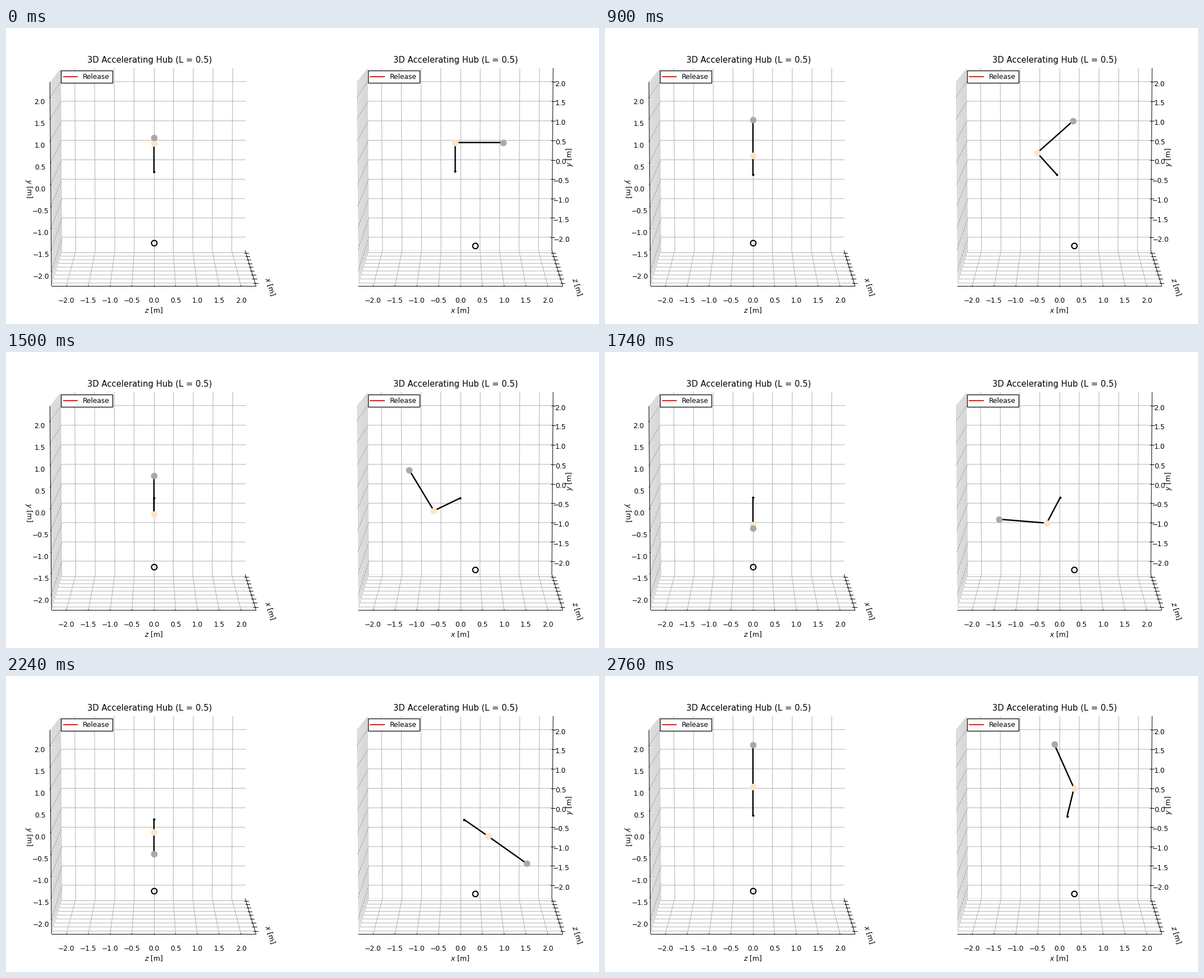
A matplotlib script that plays this animation: 1058x529 px, repeating every 2.78 s.

```python
import math

import matplotlib.pyplot as plt
import numpy as np
from matplotlib.animation import FuncAnimation
from matplotlib.collections import LineCollection
from matplotlib.patches import Rectangle

W, H = 1058, 529
FRAMES, STEP_MS = 139, 20

plt.rcParams["font.family"] = "DejaVu Sans"
plt.rcParams["mathtext.fontset"] = "dejavusans"
fig = plt.figure(figsize=(12, 6), dpi=W / 12, facecolor="white")
ax = fig.add_axes([0, 0, 1, 1])
ax.set_xlim(0, W)
ax.set_ylim(H, 0)
ax.axis("off")

# Perspective camera shared by both views
ELEV = math.radians(7.36)
COS, SIN = math.cos(ELEV), math.sin(ELEV)
SCALE, FOCAL, DIST = 1.1 / 4.5, 3027, 10
CY = 256.6
LEFT, RIGHT = 263.6, 810.9
EDGE = 2.25 * 25 / 24
TICKS = np.arange(-2, 2.1, 0.5)


def project(cx, h, y, near):
    k = FOCAL * SCALE / (DIST - SCALE * (near * COS + y * SIN))
    return cx + h * k, CY - (y * COS - near * SIN) * k


def strokes(segments, color, width, z):
    ax.add_collection(LineCollection(segments, colors=color, linewidths=width, zorder=z))


def label(x, y, text, size=10):
    """Text whose capitals are centred on (x, y)."""
    drop = 0.365 * size * fig.dpi / 72
    ax.text(x, y + drop, text, size=size, ha="center", va="baseline", zorder=4)


def slanted(x, y, text, angle):
    ax.text(x, y, text, size=10, rotation=angle, ha="center", va="center", zorder=4)


def number(v):
    return f"{v:.1f}".replace("-", "\u2212")


def draw_box(cx):
    def p(h, y, near):
        return project(cx, h, y, near)

    grid = []
    for t in TICKS:
        grid.append([p(t, EDGE, -EDGE), p(t, -EDGE, -EDGE), p(t, -EDGE, EDGE)])
        grid.append([p(EDGE, t, -EDGE), p(-EDGE, t, -EDGE), p(-EDGE, t, EDGE)])
        grid.append([p(-EDGE, EDGE, t), p(-EDGE, -EDGE, t), p(EDGE, -EDGE, t)])
    strokes(grid, "#b0b0b0", 0.8, 1)

    near_left = p(-EDGE, -EDGE, EDGE)
    near_right = p(EDGE, -EDGE, EDGE)
    far_right = p(EDGE, -EDGE, -EDGE)
    axes = [[near_left, near_right], [far_right, near_right]]
    if cx == LEFT:
        axes.append([p(-EDGE, EDGE, EDGE), near_left])
    else:
        axes.append([p(EDGE, EDGE, -EDGE), far_right])
        strokes([[p(-EDGE, -EDGE, -EDGE), far_right]], "#e9e9e9", 0.8, 0.5)

    for t in TICKS:
        x, y = p(EDGE, -EDGE, t)
        axes.append([(x - 3, y), (x + 5.5, y)])
        axes.append([p(t, -EDGE, EDGE - 0.08), p(t, -EDGE, EDGE + 0.04)])
        if cx == LEFT:
            x, y = p(-EDGE, t, EDGE)
            axes.append([(x - 1.3, y), (x + 0.5, y)])
        else:
            x, y = p(EDGE, t, -EDGE)
            axes.append([(x - 3, y), (x + 5, y)])
    strokes(axes, "black", 0.8, 2)


def draw_legend(x):
    ax.add_patch(Rectangle((x, 76.3), 91.8, 21.8, fc="white", ec="black", lw=1, zorder=5))
    ax.plot([x + 4.3, x + 28.8], [86.5, 86.5], color="red", lw=1.5, zorder=6)
    ax.text(x + 38.6, 91, "Release", size=10, va="baseline", zorder=6)


for cx, title_x, legend_x, name in ((LEFT, 256, 98.2, "z"), (RIGHT, 802.5, 645.8, "x")):
    draw_box(cx)
    draw_legend(legend_x)
    label(title_x, 56.8, "3D Accelerating Hub (L = 0.5)", 12)
    label(cx - 0.5, 505, f"${name}$ [m]")
    for t in TICKS:
        label(cx + 78 * t, 486.7, number(t))

for t in TICKS:
    label(61.2 - 0.6 * t, 287.5 - 78.1 * t, number(t))
    label(989.9 - 0.55 * t, 238.2 - 69.5 * t, number(t))

slanted(471.5, 462.5, "$x$ [m]", -73)
slanted(1018.8, 462.5, "$z$ [m]", -73)
slanted(40.5, 287, "$y$ [m]", -89.6)
slanted(1005.5, 231, "$y$ [m]", 89.6)

# Motion: the arms turn as one rigid corner, then the outer one swings free
ARM, SLING = 0.7, 1.157
SPIN, FREE = 0.02065, 62
KNOTS = np.array([FREE, 81, 87, 102, 108, 122, 135, 138])
ARM_TURN = np.array([SPIN * FREE**2, 134, 152.4, 201, 221, 273.3, 332, 346.5])
SLING_TURN = np.array([SPIN * FREE**2, 146, 175.3, 260.4, 298.8, 386.7, 458.2, 474])

HUB_N = [0, 26, 62, 87, 102, 122, 138]
HUB_X = np.polyfit(HUB_N, [-0.126, -0.103, -0.035, 0.013, 0.057, 0.124, 0.185], 3)
HUB_Y = np.polyfit(HUB_N, [0.006, -0.047, -0.069, -0.053, -0.026, 0.03, 0.08], 3)


def turn(n, values):
    """Constant acceleration first, then a smooth curve through the knots."""
    if n <= FREE:
        return SPIN * n * n
    slopes = np.gradient(values, KNOTS, edge_order=2)
    slopes[0] = 2 * SPIN * FREE
    i = min(np.searchsorted(KNOTS, n, side="right") - 1, len(KNOTS) - 2)
    span = KNOTS[i + 1] - KNOTS[i]
    u = (n - KNOTS[i]) / span
    return (
        values[i] * (1 + 2 * u) * (1 - u) ** 2
        + values[i + 1] * u * u * (3 - 2 * u)
        + span * u * (1 - u) * (slopes[i] * (1 - u) - slopes[i + 1] * u)
    )


def pose(n):
    a = math.radians(90 + turn(n, ARM_TURN))
    b = math.radians(turn(n, SLING_TURN))
    hub = np.array([np.polyval(HUB_X, n), np.polyval(HUB_Y, n)])
    joint = hub + ARM * np.array([math.cos(a), math.sin(a)])
    bob = joint + SLING * np.array([math.cos(b), math.sin(b)])
    return hub, joint, bob


def on_stage(cx, point):
    x, y = point
    return project(cx, 0, y, -x) if cx == LEFT else project(cx, x, y, 0)


def dot(size, color, z, edge=0.5):
    return ax.plot([], [], "o", ms=size, mfc=color, mec=color, mew=edge, zorder=z)[0]


views = []
for cx in (LEFT, RIGHT):
    ring = on_stage(cx, (0.354, -1.81))
    ax.plot(*ring, "o", ms=8, mfc="none", mec="black", mew=1.7, zorder=7)
    rod = ax.plot([], [], color="black", lw=2, zorder=8)[0]
    dots = dot(2.8, "black", 9), dot(9, "bisque", 10), dot(9, "darkgray", 11)
    views.append((cx, rod, dots))


def update(n):
    points = pose(n)
    changed = []
    for cx, rod, dots in views:
        spots = [on_stage(cx, q) for q in points]
        rod.set_data(*zip(*spots))
        for d, (x, y) in zip(dots, spots):
            d.set_data([x], [y])
        changed += [rod, *dots]
    return changed


anim = FuncAnimation(fig, update, frames=FRAMES, interval=STEP_MS, repeat=True, repeat_delay=0)
plt.show()
```
